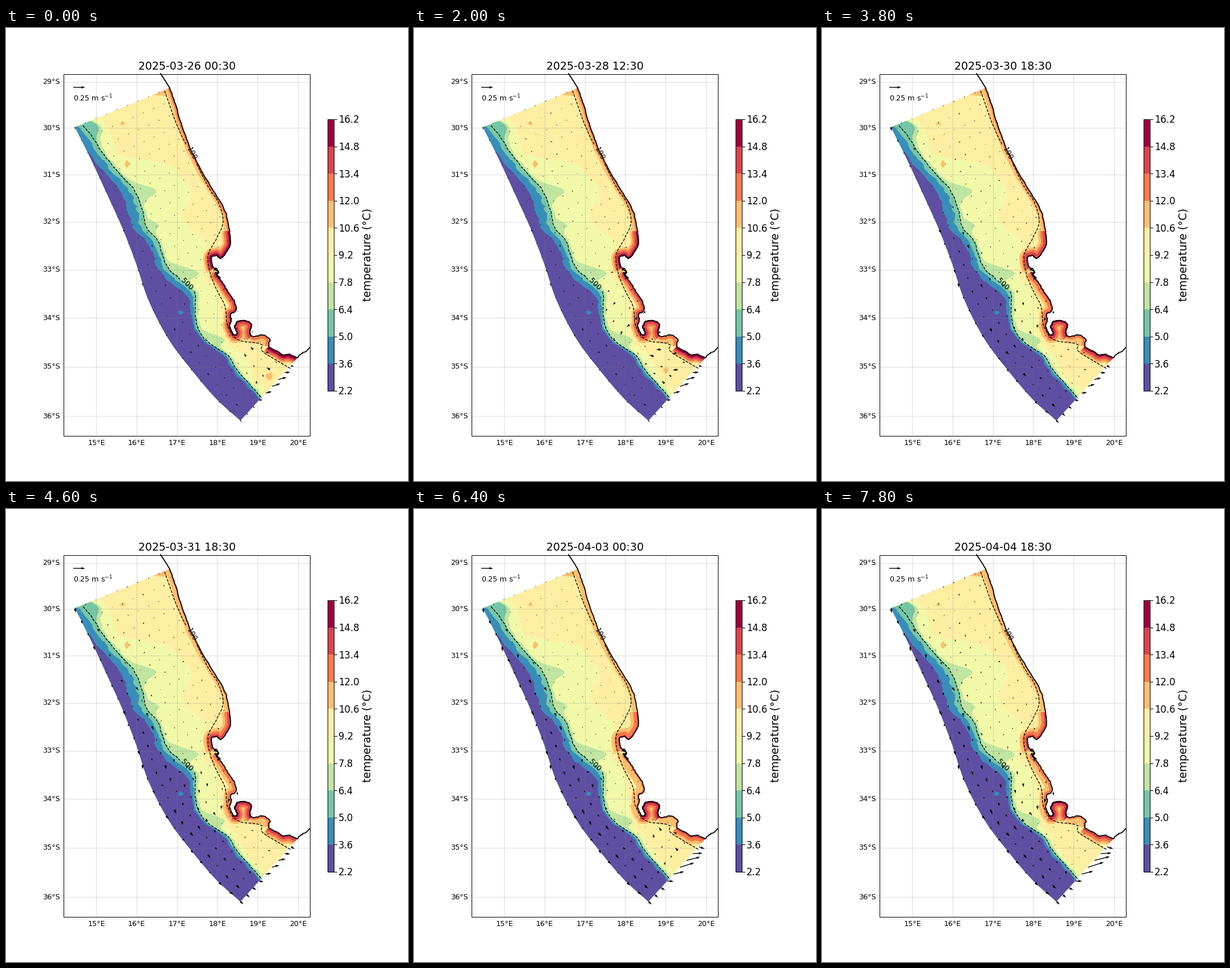
Write a matplotlib script that moves like this. It is 705 px wide and 794 px high and loops after 8 s.

```python
import numpy as np
import matplotlib.pyplot as plt
from matplotlib.animation import FuncAnimation
from matplotlib.patches import Polygon, Rectangle
from matplotlib.path import Path

W, H, DPI = 705, 794, 100
FRAMES, STEP_MS, STEP_HOURS = 40, 200, 6
START = np.datetime64("2025-03-26T00:30")
PX = 72 / DPI  # points per pixel
SMALL, MEDIUM, LARGE = 12.7, 16.5, 19.05
COLORS = plt.get_cmap("Spectral_r", 10)(np.arange(10))
SUB = 6  # spline points per key point
rng = np.random.default_rng(4)


def spline(keys, ragged=0.0):
    """Catmull-Rom curve through the key points, optionally ragged."""
    p = np.array(keys, float)
    p = np.vstack([2 * p[0] - p[1], p, 2 * p[-1] - p[-2]])
    a, b, c, d = (p[k:len(p) - 3 + k, None] for k in range(4))
    t = (np.arange(SUB) / SUB)[None, :, None]
    q = b + t * (c - a) / 2 + t**2 * (a - 2.5 * b + 2 * c - d / 2) \
        + t**3 * (1.5 * (b - c) + (d - a) / 2)
    q = np.vstack([q.reshape(-1, 2), p[-2:-1]])
    q[1:-1] += rng.normal(0, ragged, (len(q) - 2, 2))
    return q


def bump(x, center, width):
    return np.exp(-((x - center) / width) ** 2)


def sigmoid(x):
    return 1 / (1 + np.exp(-np.clip(x, -50, 50)))


SHORE = spline([
    (287, 105), (298, 135), (312, 182), (327, 219), (350, 263), (374, 301),
    (386, 326), (392, 355), (393, 380), (378, 403), (369, 399), (360, 402),
    (364, 420), (373, 428), (370, 434), (381, 448), (390, 463), (399, 477),
    (404, 493), (394, 502), (395, 512), (392, 523), (399, 537), (405, 536),
    (401, 524), (405, 515), (416, 513), (430, 518), (428, 533), (431, 540),
    (441, 540), (450, 538), (463, 546), (461, 558), (478, 568), (487, 573),
    (497, 572), (511, 578)], .4)
BORDER = spline([(271, 80), (279, 92), (287, 105)])
EAST = spline([(511, 578), (516, 572), (527, 566), (533, 560)], .4)
OFFSHORE = spline([
    (121, 174), (150, 232), (180, 297), (204, 350), (228, 412), (250, 477),
    (285, 545), (327, 601), (369, 650), (411, 688)])
INLAND = spline([(287, 105), (335, 222), (380, 345), (415, 445), (511, 580)])
ISO_500 = spline([
    (135, 171), (151, 190), (168, 217), (198, 254), (226, 286), (240, 322),
    (246, 349), (266, 372), (274, 396), (286, 423), (305, 440), (330, 462),
    (332, 500), (336, 524), (352, 548), (389, 574), (403, 597), (425, 622),
    (449, 649)], .4)
ISO_100 = spline([
    (278, 110), (299, 168), (313, 199), (331, 231), (355, 279), (372, 305),
    (381, 338), (370, 368), (354, 400), (362, 442), (384, 488), (388, 520),
    (406, 546), (447, 554), (451, 568), (499, 597)], .2)
DOMAIN = np.vstack([SHORE, OFFSHORE[::-1]])

# Coastal stretches: first and last key point, reach in px, warmest and coolest °C
COAST_HEAT = [
    (0, 8, 8, 13.1, 12.0),
    (7, 12, 14, 16.2, 13.8),
    (13, 22, 12, 15.4, 12.2),
    (22, 29, 14, 15.4, 15.8),
    (29, 33, 12, 13.4, 12.2),
    (33, 37, 14, 17.0, 14.0),
]


def cooling(i):
    return np.interp(i, [0, 14, 23, 29, 39], [0, .2, .6, 1, .75])


def slope_x(y):
    """Position of the shelf break at height y."""
    p = np.vstack([(100, 140), ISO_500, (470, 669)])
    p = p[np.argsort(p[:, 1])]
    return np.interp(y, p[:, 1], p[:, 0])


# Isotherms as distances from the shelf break
Y = np.arange(140, 670, 3.0)
front = 7 + 18 * sigmoid((468 - Y) / 6) - 9 * bump(Y, 400, 25)
OFFSETS = [
    -front,
    -.45 * front + 1,
    25 * bump(Y, 170, 18),
    (5 + 24 * bump(Y, 172, 20) + 32 * bump(Y, 285, 13) + 18 * bump(Y, 346, 9)
     + 40 * bump(Y, 428, 13) + 30 * bump(Y, 545, 10)),
    np.interp(Y, [150, 222, 240, 285, 330, 370, 405, 450, 520, 580, 650],
              [48, 22, 105, 100, 66, 83, 72, 37, 45, 9, 18]),
]
OFFSETS = [o + np.convolve(rng.normal(0, 2, len(Y)), np.ones(3) / 3, "same")
           for o in OFFSETS]


def band(offset):
    edge = np.column_stack([slope_x(Y) + offset, Y])
    return np.vstack([edge, [(480, 730), (60, 730), (60, 100)]])


# Curvilinear grid of arrows
def along(p, s):
    d = np.r_[0, np.cumsum(np.hypot(*np.diff(p, axis=0).T))]
    return np.column_stack([np.interp(s * d[-1], d, c) for c in p.T])


def on_grid(u, v):
    return along(OFFSHORE, v) * (1 - u)[:, None] + along(INLAND, v) * u[:, None]


u, v = (g.ravel() for g in np.meshgrid(np.linspace(0, 1, 10), np.linspace(0, 1, 25)))
inside = Path(DOMAIN).contains_points(on_grid(u * .98 + .01, v * .97 + .015))
u, v = u[inside], v[inside]
base = on_grid(u, v)
bx, by = base.T
ahead = on_grid(u, np.minimum(v + .01, 1)) - on_grid(u, v - .01)
down_slope = (ahead[:, 0] + 1j * ahead[:, 1]) / np.hypot(*ahead.T)
deep = sigmoid((slope_x(by) - bx) / 6)
south = np.clip((by - 380) / 120, 0, 1)
southeast = sigmoid((bx - 400) / 10) * sigmoid((by - 530) / 10)
outlet = v > .99
jet = bump(u, .6, .24)
scatter = rng.uniform(.35, 1.15, len(u)) * np.exp(1j * rng.normal(0, .3, len(u)))


def currents(i):
    """Slope current, daily rotation on the shelf, and a jet across the south edge."""
    ramp = sigmoid((i - 18) / 3)
    reverse = 1 - 2 * bump(by, 275, 45) * (1 - ramp)
    slope = down_slope * reverse * (3.5 + 4.5 * ramp)
    daily = np.exp(-2j * np.pi * i * STEP_HOURS / 24 - 1j * south * np.pi / 4)
    shelf = (-1 + 1j + daily * (2 + 2 * south) * (.6 + .5 * i / FRAMES)
             + south * 2j + southeast * (-5 - 6j))
    flow = (deep * slope + (1 - deep) * shelf) * scatter
    speed = np.interp(i, [0, 6, 14, 29, 32, 39], [16, 23, 12, 15, 27, 30])
    exit_flow = jet * speed * np.exp(-.35j + .5j * (u - .5)) + (1 - jet) * slope
    flow = np.where(outlet, exit_flow, flow)
    return flow.real, flow.imag


fig = plt.figure(figsize=(W / DPI, H / DPI), dpi=DPI, facecolor="white")
ax = fig.add_axes([0, 0, 1, 1])
ax.set_xlim(0, W)
ax.set_ylim(H, 0)
ax.axis("off")


def text(x, y, s, px, **kw):
    return ax.text(x, y, s, fontsize=px * PX, **kw)


def line(x, y, px, z, **kw):
    return ax.plot(x, y, lw=px * PX, zorder=z, **kw)[0]


def box(x, y, w, h, **kw):
    return ax.add_patch(Rectangle((x, y), w, h, **kw))


sea = ax.add_patch(Polygon(DOMAIN, fc=COLORS[5], lw=0, zorder=1))


def fill(p, level):
    patch = ax.add_patch(Polygon(p, fc=COLORS[level], lw=0, zorder=1))
    patch.set_clip_path(sea)
    return patch


def blob(x, y, a, b, level):
    t = np.linspace(0, 2 * np.pi, 12)
    r = rng.uniform(.75, 1.15, 12)
    return fill(np.column_stack([x + a * r * np.cos(t), y + b * r * np.sin(t)]), level)


bands = [fill(band(OFFSETS[k]), k) for k in (4, 3, 2, 1, 0)]
blob(306, 499, 5, 4, 1)
blob(212, 238, 4, 6, 6)
blob(204, 168, 4, 2.5, 6)
fill([(246, 116), (280, 119), (300, 100), (280, 90)], 6)
pool = blob(0, 0, 7, 7, 6)
pool_shape = pool.get_xy().copy()

strips = []
for n in range(4):
    for a, b, reach, warm, cool in COAST_HEAT:
        p = SHORE[a * SUB:b * SUB + 1]
        strip = line(*p.T, 0, 1.5, color=COLORS[6 + n],
                     solid_capstyle="butt", solid_joinstyle="round")
        strip.set_clip_path(sea)
        strips.append((strip, 1.4 * n, reach, warm, cool))


# Mercator graticule and frame
DEGREE = 70.8


def mercator(lat):
    return np.log(np.tan(np.pi / 4 + np.radians(lat) / 2))


GRID = dict(color="gray", ls=":", alpha=.7)
for lon in range(15, 21):
    x = 158 + DEGREE * (lon - 15)
    line([x, x], [715, 81], 1.02, 2, **GRID)
    text(x + .5, 731, f"{lon}°E", SMALL, ha="center")
for lat in range(29, 37):
    y = 94.5 + .9955 * np.degrees(DEGREE) * (mercator(lat) - mercator(29))
    line([101, 533], [y, y], 1.02, 2, **GRID)
    text(94.5, y, f"{lat}°S", SMALL, ha="right", va="center")
box(101, 81, 432, 634, fill=False, lw=1.02 * PX, zorder=7)

for p, label, x, y, angle in ((ISO_500, "500", 317, 449.5, -45),
                              (ISO_100, "100", 325.5, 220, -62)):
    gap = np.hypot(p[:, 0] - x, p[:, 1] - y) < 15
    line(*np.where(gap[:, None], np.nan, p).T, 1.3, 3, color="black", ls="--")
    text(x, y, label, SMALL, rotation=angle, ha="center", va="center", zorder=4)
line(*np.vstack([BORDER, SHORE, EAST]).T, 1.8, 5, color="black")
lagoon = spline([(365, 424), (369, 421), (372, 428), (367, 429), (372, 434), (376, 438)], .6)
line(*lagoon.T, 1.8, 5, color="black")

ARROW = dict(angles="xy", scale_units="xy", scale=1, units="xy", width=1.4, zorder=6)
arrows = ax.quiver(bx, by, *currents(0), **ARROW)
ax.quiver([118], [104], [21], [0], **ARROW)
text(118, 128, "0.25 m s$^{-1}$", SMALL)

# Colour bar
TOP, BOTTOM = 160, 636
cell = (BOTTOM - TOP) / 10
for n, color in enumerate(COLORS):
    box(564, BOTTOM - (n + 1) * cell, 11, cell, fc=color, lw=0)
for n in range(11):
    y = BOTTOM - n * cell
    line([575.5, 580], [y, y], 1.02, 3, color="black")
    text(583, y - .5, f"{2.2 + 1.4 * n:.1f}", MEDIUM, va="center_baseline")
box(564, TOP, 11, BOTTOM - TOP, fill=False, lw=1.02 * PX)
text(634.5, 397, "temperature (°C)", LARGE, rotation=90, ha="center", va="center")
title = text(317, 73, "", LARGE, ha="center")


def draw(i):
    now = START + np.timedelta64(STEP_HOURS * i, "h")
    title.set_text(str(now).replace("T", " "))
    c = cooling(i)
    for strip, rise, reach, warm, cool in strips:
        excess = warm + (cool - warm) * c - 10.6
        strip.set_linewidth(2 * reach * max(0, 1 - rise / excess) * PX)
    bands[0].set_xy(band(OFFSETS[4] + 22 * np.exp(-i / 14) * bump(Y, 582, 24)))
    fade = np.clip(1.4 - i / 16, 0, 1)
    pool.set_xy(pool_shape * fade + (462 - 2 * min(i, 15), 610 - i))
    arrows.set_UVC(*currents(i))
    return title, arrows


anim = FuncAnimation(fig, draw, frames=FRAMES, interval=STEP_MS, repeat=True, blit=False)
plt.show()
```
